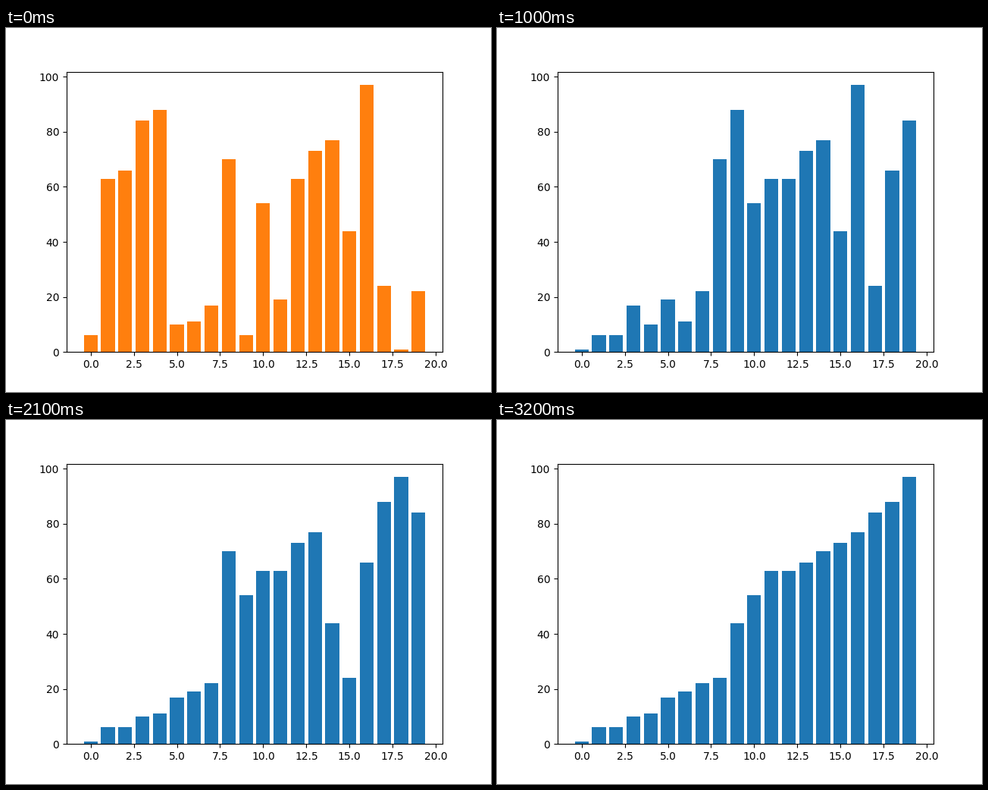
These frames come from a looping animation (640x480 px, 3300 ms). A matplotlib script:

```python
import matplotlib.pyplot as plt
from matplotlib.animation import FuncAnimation

VALUES = [6, 63, 66, 84, 88, 10, 11, 17, 70, 6,
          54, 19, 63, 73, 77, 44, 97, 24, 1, 22]
STEP_MS = 100


def swap(a, i, j):
    """Swap two items and yield the new state if they are distinct slots."""
    if i != j:
        a[i], a[j] = a[j], a[i]
        yield a.copy()


def quicksort(a, lo, hi):
    """Lomuto quicksort, yielding the list after every swap."""
    if lo >= hi:
        return
    pivot, split = a[hi], lo
    for j in range(lo, hi):
        if a[j] <= pivot:
            yield from swap(a, split, j)
            split += 1
    yield from swap(a, split, hi)
    yield from quicksort(a, lo, split - 1)
    yield from quicksort(a, split + 1, hi)


states = [VALUES, *quicksort(VALUES.copy(), 0, len(VALUES) - 1)]

fig, ax = plt.subplots(figsize=(6.4, 4.8), dpi=100)
bars = ax.bar(range(len(VALUES)), VALUES)


def update(step):
    color = "C1" if step == 0 else "C0"
    for bar, height in zip(bars, states[step]):
        bar.set_height(height)
        bar.set_color(color)
        bar.set_edgecolor("none")
    return bars


anim = FuncAnimation(fig, update, frames=len(states), interval=STEP_MS,
                     init_func=lambda: update(0), repeat=True,
                     repeat_delay=0, blit=False)
plt.show()
```
